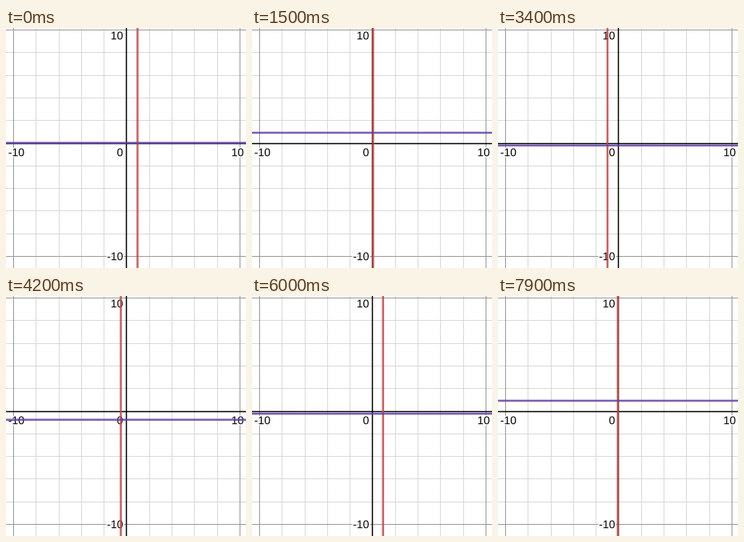
These frames come from a looping animation (300x300 px, 8 s). A matplotlib script:

```python
import numpy as np
import matplotlib.pyplot as plt
from matplotlib.animation import FuncAnimation
from matplotlib.patheffects import withStroke

SIZE, DPI = 300, 100
FRAMES, INTERVAL = 80, 100
PX = 72 / DPI                    # points per pixel
STEP = 28.3                      # two graph units
ORIGIN = (150.9, 144.01)
RED, PURPLE = "#c74440", "#6042a6"

plt.rcParams["font.family"] = "Liberation Sans"
fig = plt.figure(figsize=(SIZE / DPI, SIZE / DPI), dpi=DPI, facecolor="white")
ax = fig.add_axes([0, 0, 1, 1])
ax.set_xlim(0, SIZE)
ax.set_ylim(SIZE, 0)
ax.axis("off")


def vline(x, color, width, **kw):
    return ax.plot([x, x], [-5, SIZE + 5], color=color, lw=width * PX,
                   snap=False, **kw)[0]


def hline(y, color, width, **kw):
    return ax.plot([-5, SIZE + 5], [y, y], color=color, lw=width * PX,
                   snap=False, **kw)[0]


def label(x, y, text, align):
    ax.text(x, y, text, ha=align, va="baseline", fontsize=14 * PX,
            color="black", zorder=4,
            path_effects=[withStroke(linewidth=3 * PX, foreground="white")])


# Grid lines sit on pixel centres; the outermost are major, the middle ones axes
for k in range(-5, 6):
    if k == 0:
        color, width, z = "black", 1.5, 3
    elif abs(k) == 5:
        color, width, z = "#999999", 1, 2
    else:
        color, width, z = "#d9d9d9", 1, 1
    vline(np.floor(ORIGIN[0] + k * STEP) + 0.5, color, width, zorder=z)
    hline(np.floor(ORIGIN[1] + k * STEP) + 0.5, color, width, zorder=z)

label(146.3, 14.3, "10", "right")
label(146.3, 290.2, "-10", "right")
label(146.3, 160.2, "0", "right")
label(2.8, 160.2, "-10", "left")
label(297.2, 160.2, "10", "right")

red = vline(0, RED, 2.5, zorder=5, alpha=0.85)
purple = hline(0, PURPLE, 2.5, zorder=6, alpha=0.85)


def update(i):
    t = i * INTERVAL / 1000      # one radian per second
    x = 150.4 + 14 * np.cos(t)
    y = 143.6 - 12.7 * np.sin(t)
    red.set_xdata([x, x])
    purple.set_ydata([y, y])
    return red, purple


anim = FuncAnimation(fig, update, frames=FRAMES, interval=INTERVAL,
                     repeat=True, repeat_delay=0, blit=False)
plt.show()
```
